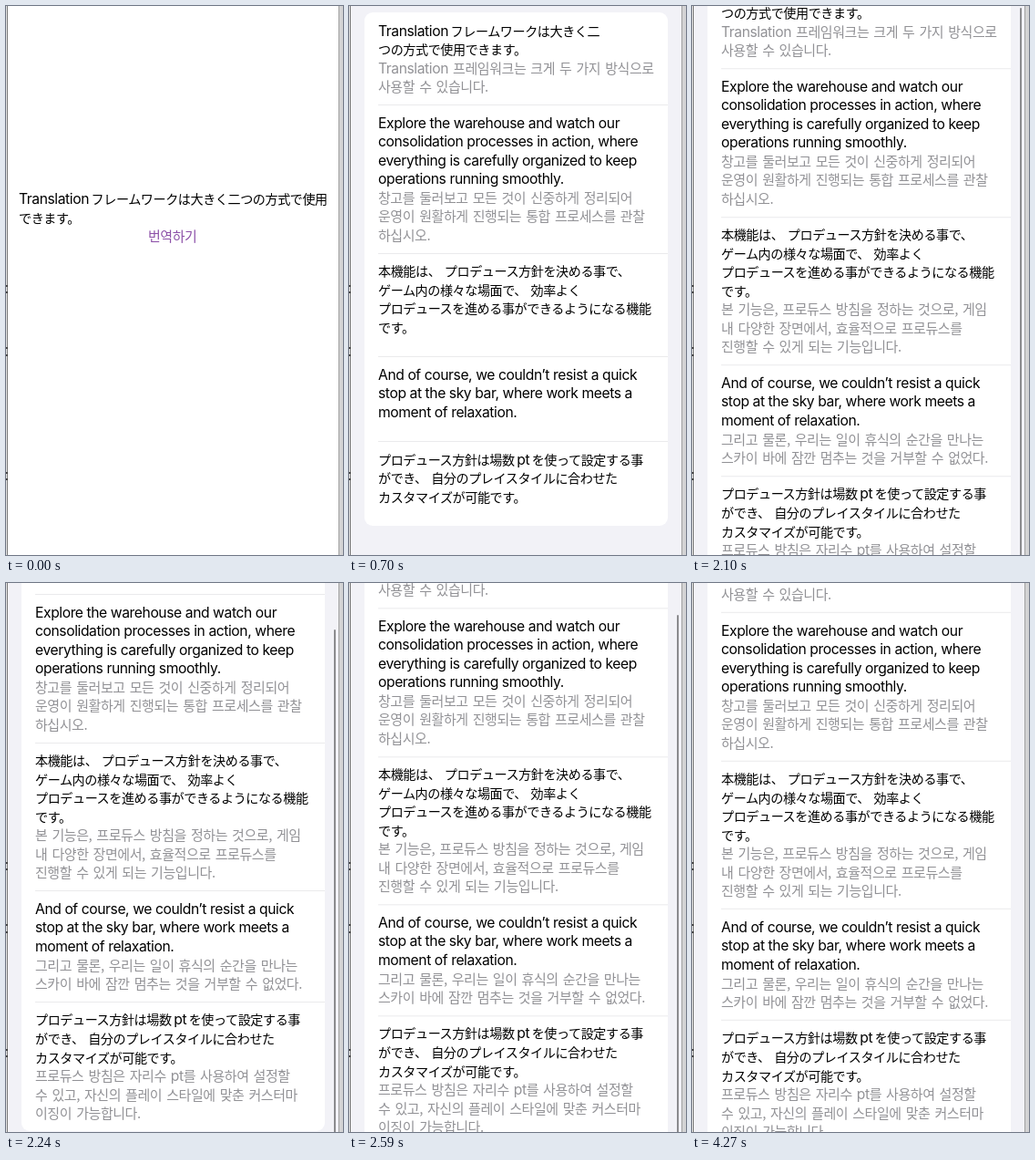
An HTML page that plays this animation: 370 px wide and 602 px high, repeating every 4.76 s.

```html
<!DOCTYPE html>
<html lang="ja">
<head>
<meta charset="utf-8">
<style>
html, body { margin: 0; width: 100%; height: 100%; overflow: hidden; background: #fff; }
#stage { position: absolute; left: 0; top: 0; width: 370px; height: 602px; overflow: hidden; }
#stage, .line { font: 15.7px/20.55px Inter, sans-serif; letter-spacing: -.43px; color: #000; }
.line { height: 20.55px; white-space: pre; }
.line b, .line i { font-weight: 400; font-style: normal; line-height: 0; }
.ja b { font-family: "Noto Sans CJK JP", sans-serif; font-size: 14.1px; word-spacing: 1.8px; }
.ja i { margin: 0 2.6px; }
.ja i:first-child { margin-left: 0; }
.ko b { font-family: "Noto Sans CJK KR", sans-serif; font-size: 15px; word-spacing: 2.1px; }
.line.ko { color: #929296; }
#home { position: absolute; left: 14px; top: 202px; }
#home .ko { color: #8c50a8; padding-left: 142px; }
#list { position: absolute; inset: 0; background: #f2f2f7; }
#card { position: absolute; left: 17px; top: 7px; width: 333px; background: #fff; border-radius: 9px; }
.row { position: relative; padding: 10.5px 0 8.35px 15px; }
.row + .row::before { content: ""; position: absolute; left: 15px; right: 0; top: 0; height: 1px; background: #eaeaec; }
#bar { position: absolute; left: 359.6px; width: 2.8px; height: 640px; border-radius: 2px; background: #8b8b8e; }
.edge { position: absolute; top: 0; height: 602px; box-sizing: border-box; }
#left { left: 0; width: 2px; background: #e4e4e4; border-right: 1px solid #7c7c7c; }
#right { left: 365px; width: 5px; background: #d3d3d4; border-left: 1px solid #a0a0a0; }
#left u { position: absolute; left: 0; width: 2px; height: 1.5px; background: #444; }
</style>
</head>
<body>
<div id="stage">
  <div id="home"></div>
  <div id="list"><div id="card"></div><div id="bar"></div></div>
  <div class="edge" id="left"></div>
  <div class="edge" id="right"></div>
</div>
<script>
const LOOP = 4760, TICK = 70, LINE = 20.55, EMPTY = 12.6, REST = 76.2;
const $ = id => document.getElementById(id);
const clamp = v => Math.max(0, Math.min(1, v));

// start and length of each translation's arrival, then both texts
const rows = [
  { start: -70, time: 70, lang: 'ja',
    text: ['Translationフレームワークは大きく二', 'つの方式で使用できます。'],
    ko: ['Translation 프레임워크는 크게 두 가지 방식으로', '사용할 수 있습니다.'] },
  { start: 630, time: 70, lang: 'en',
    text: ['Explore the warehouse and watch our', 'consolidation processes in action, where',
      'everything is carefully organized to keep', 'operations running smoothly.'],
    ko: ['창고를 둘러보고 모든 것이 신중하게 정리되어', '운영이 원활하게 진행되는 통합 프로세스를 관찰', '하십시오.'] },
  { start: 910, time: 70, lang: 'ja',
    text: ['本機能は、 プロデュース方針を決める事で、', 'ゲーム内の様々な場面で、 効率よく',
      'プロデュースを進める事ができるようになる機能', 'です。'],
    ko: ['본 기능은, 프로듀스 방침을 정하는 것으로, 게임', '내 다양한 장면에서, 효율적으로 프로듀스를', '진행할 수 있게 되는 기능입니다.'] },
  { start: 1260, time: 140, lang: 'en',
    text: ['And of course, we couldn’t resist a quick', 'stop at the sky bar, where work meets a', 'moment of relaxation.'],
    ko: ['그리고 물론, 우리는 일이 휴식의 순간을 만나는', '스카이 바에 잠깐 멈추는 것을 거부할 수 없었다.'] },
  { start: 1610, time: 70, lang: 'ja',
    text: ['プロデュース方針は場数ptを使って設定する事', 'ができ、 自分のプレイスタイルに合わせた', 'カスタマイズが可能です。'],
    ko: ['프로듀스 방침은 자리수 pt를 사용하여 설정할', '수 있고, 자신의 플레이 스타일에 맞춘 커스터마', '이징이 가능합니다.'] }
];

// Latin and CJK runs get their own fonts
const runs = s => s.replace(/[A-Za-z]+|[^A-Za-z]+/g, m => /[A-Za-z]/.test(m) ? `<i>${m}</i>` : `<b>${m}</b>`);
const lines = (list, lang) =>
  list.map(s => `<div class="line ${lang}">${lang === 'en' ? s : runs(s)}</div>`).join('');

$('home').innerHTML =
  lines(['Translationフレームワークは大きく二つの方式で使用', 'できます。'], 'ja') + lines(['번역하기'], 'ko');
$('card').innerHTML = rows.map(r =>
  `<div class="row">${lines(r.text, r.lang)}<div class="reply">${lines(r.ko, 'ko')}</div></div>`).join('');
$('left').innerHTML = [306, 313, 374, 382, 511, 518].map(y => `<u style="top:${y}px"></u>`).join('');
const replies = document.querySelectorAll('.reply');

// flick past the end, then spring back to rest
function scrollAt(t) {
  const peak = 103.9;
  if (t < 2310) return peak * Math.sin(Math.PI / 2 * clamp((t - 2030) / 280));
  const x = (t - 2310) * .0117;
  return REST + (peak - REST) * (1 + x) * Math.exp(-x);
}

function draw(now) {
  const t = Math.floor(now % LOOP / TICK) * TICK;
  $('list').style.opacity = clamp((t - 70) / 490);
  rows.forEach((r, i) => {
    const open = clamp((t - r.start) / r.time);
    replies[i].style.opacity = open;
    replies[i].style.height = EMPTY + (r.ko.length * LINE - EMPTY) * open + 'px';
  });
  // the list only starts moving after 2030 ms
  const s = scrollAt(t), over = s - REST;
  $('card').style.transform = `translateY(${-s}px)`;
  $('bar').style.top = 31 + over * (over > 0 ? 1 : .8) + 'px';
  $('bar').style.opacity = t < 2100 ? 0 : clamp(1 - (t - 3920) / 350);
}

const begin = performance.now();
function loop() {
  draw(performance.now() - begin);
  requestAnimationFrame(loop);
}
loop();
</script>
</body>
</html>
```
